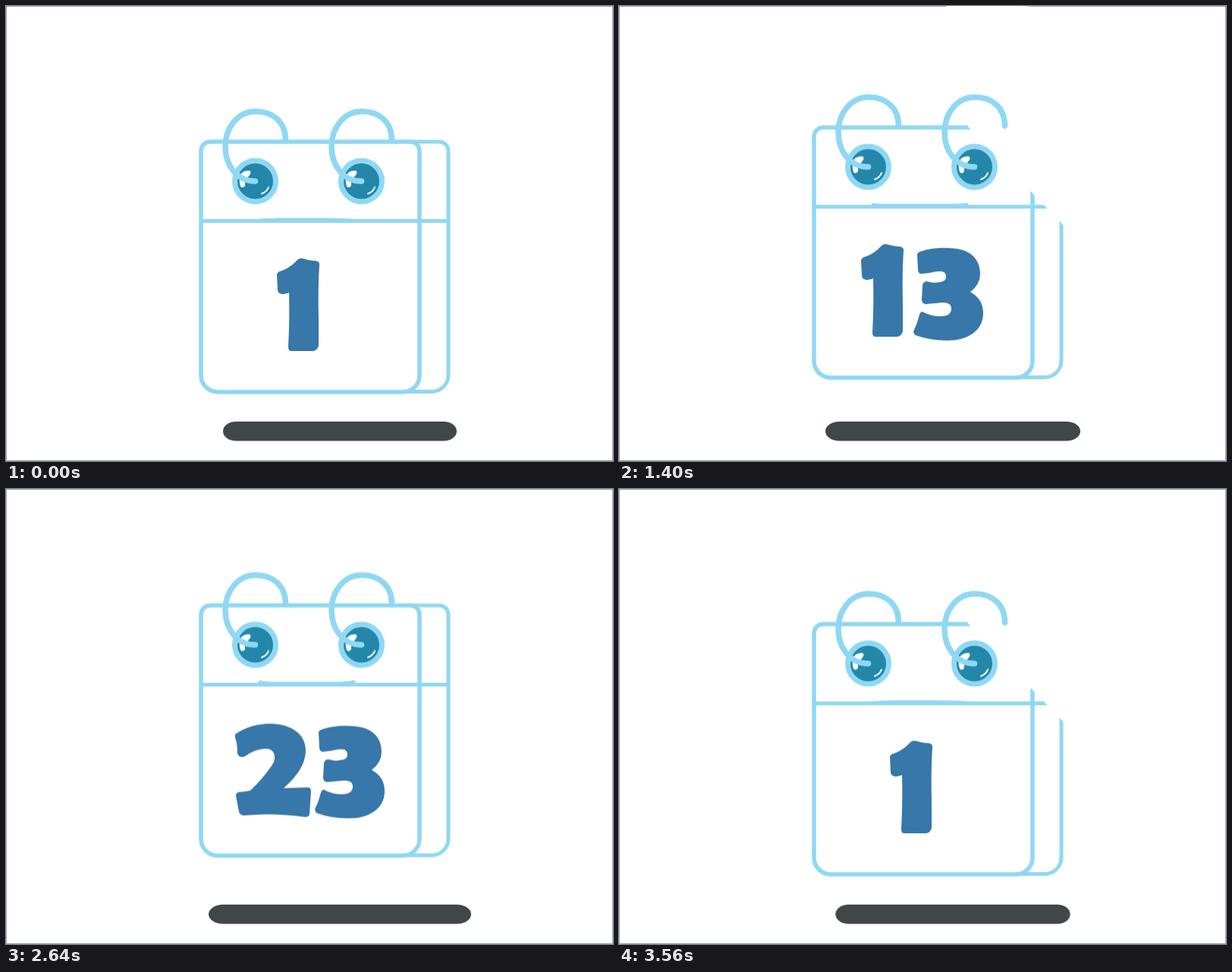
These frames come from a looping animation (800 px wide and 600 px high, 3.6 s). An HTML page without scripts:

```html
<!DOCTYPE html>
<html lang="en">
<head>
<meta charset="utf-8">
<title>Bouncing calendar</title>
<style>
  html, body { margin: 0; width: 100%; height: 100%; overflow: hidden; background: #fff; }
  svg { display: block; width: 100vw; height: 100vh; }

  .line { fill: none; stroke: #8fd8f4; stroke-width: 5.5; }
  .thin { stroke-width: 5; }
  .cap { stroke-linecap: round; }
  .ring { stroke-width: 7.5; }
  .paper { fill: #fff; }
  .ink { fill: #3777a9; fill-rule: evenodd; }

  .calendar, .shadow, .mouth {
    animation: rise 600ms cubic-bezier(.3333, 0, .6667, 1) infinite alternate;
  }
  .shadow { animation-name: spread; transform-origin: 440px 561px; }
  .mouth { animation-name: smile; }
  @keyframes rise { to { transform: translateY(-72px); } }
  @keyframes spread { to { transform: scaleX(1.348); } }
  @keyframes smile {
    from { d: path("M335 283C345 283 350 282 360 282H424C440 282 450 283 458 283"); }
    to { d: path("M335 276C340 282 346 283 355 283H440C449 283 454 281 458 275"); }
  }

  /* One day lasts 120ms: still, peeling, flying off. */
  .strip { animation: days 3600ms steps(30) -1ms infinite; }
  .next { animation-delay: -81ms; }
  .peel { animation: peel 120ms step-end -1ms infinite; }
  .fly { animation: fly 120ms step-end -1ms infinite; }
  @keyframes days { to { transform: translateX(-9000px); } }
  @keyframes peel {
    0%, 66.6% { visibility: hidden; }
    33.3% { visibility: visible; }
    100% { visibility: hidden; }
  }
  @keyframes fly {
    0% { visibility: hidden; }
    66.6%, 100% { visibility: visible; }
  }
</style>
</head>
<body>
<svg viewBox="0 0 800 600" role="img" aria-label="Calendar counting the days from 1 to 30">
  <defs>
    <path id="d0" d="M58 0A58 61.5 0 1 1 57.9 0ZM58 39.5A18.5 22 0 1 0 58.1 39.5Z"/>
    <path id="d1" d="M25 5Q29 0 34 1Q44 4 51 4Q57 5 56 10Q54 40 55 80V116Q53 123 47 123H19Q15 123 15 117Q17 80 16 46Q10 48 7 48Q1 47 1 42L0 22Q1 18 7 17Q17 13 25 5Z"/>
    <path id="d2" d="M0 17Q20 3 46 3C74 3 93 17 93 38C93 57 80 74 64 88L95 87Q100 87 100 92L98 122Q98 126 92 126Q50 120 12 124Q6 124 5 119L1 98Q1 93 7 93Q17 92 20 91Q36 76 47 60Q53 52 52 46C51 39 47 36 40 36Q27 36 13 46Q5 49 3 42Q3 28 0 22Z"/>
    <path id="d3" d="M5 14Q6 11 11 10Q28 5 46 6C74 6 88 20 88 40Q88 54 75 64Q92 73 92 92C92 116 70 128 45 128Q22 128 3 121Q0 119 0 116Q5 106 8 94Q10 88 14 91Q24 96 35 96C47 96 50 91 50 86C50 80 46 78 38 78Q26 79 16 80Q11 79 11 74L12 55Q13 50 18 50Q27 53 34 51Q43 50 43 44C43 37 38 36 30 37Q22 39 11 40Q6 40 6 34Z"/>
    <path id="d4" d="M52 6Q55 2 60 3L84 5Q90 6 89 12L87 70L98 69Q104 69 104 75L103 95Q103 100 97 100H88L89 119Q88 125 82 125H56Q50 125 51 119V102L8 103Q1 103 1 97L0 80Q0 76 3 72Q32 42 52 6ZM52 48Q44 62 34 72L52 71Z"/>
    <path id="d5" d="M14 7Q15 3 20 4Q50 7 80 3Q86 3 86 8L88 32Q88 38 82 38Q64 41 46 40L45 47Q92 46 93 84C93 112 72 127 43 127Q20 127 3 120Q0 118 1 114L7 91Q9 86 14 88Q28 94 39 93Q51 92 51 84Q51 74 36 75Q25 75 14 78Q8 78 8 72Z"/>
    <path id="d6" d="M78 2Q82 2 83 6L89 25Q90 33 82 33Q59 34 50 43Q57 41 66 41C89 41 104 57 104 80C104 107 83 125 54 125C23 125 0 106 0 72C0 30 32 3 78 2ZM53.5 66.5A13 13.5 0 1 0 53.6 66.5Z"/>
    <path id="d7" d="M3 9Q3 4 9 4Q45 8 85 6Q92 7 92 13L93 29Q92 33 88 37Q62 66 59 118Q57 127 50 127Q34 128 19 126Q13 124 14 117Q19 84 46 42Q25 42 6 43Q0 42 0 37Q3 25 3 9Z"/>
    <path id="d8" d="M50 2C78 2 95 14 95 34Q95 50 83 59Q101 68 101 89C101 113 80 126 50 126C20 126 0 113 0 89Q0 68 18 59Q6 50 6 34C6 14 23 2 50 2ZM50 28A12 10 0 1 0 50.1 28ZM50 76A14 12 0 1 0 50.1 76Z"/>
    <g id="d9"><use href="#d6" transform="rotate(180 52 63.5)"/></g>

    <!-- Days side by side, 300 units apart -->
    <g id="days" class="ink" transform="translate(0 332)">
      <use href="#d1" x="357"/>
      <use href="#d2" x="660"/>
      <use href="#d3" x="962"/>
      <use href="#d4" x="1258"/>
      <use href="#d5" x="1560"/>
      <use href="#d6" x="1860"/>
      <use href="#d7" x="2160"/>
      <use href="#d8" x="2460"/>
      <use href="#d9" x="2761"/>
      <use href="#d1" x="3008"/><use href="#d0" x="3075"/>
      <use href="#d1" x="3338"/><use href="#d1" x="3405"/>
      <use href="#d1" x="3618"/><use href="#d2" x="3686"/>
      <use href="#d1" x="3919"/><use href="#d3" x="3988"/>
      <use href="#d1" x="4214"/><use href="#d4" x="4282"/>
      <use href="#d1" x="4518"/><use href="#d5" x="4586"/>
      <use href="#d1" x="4815"/><use href="#d6" x="4883"/>
      <use href="#d1" x="5118"/><use href="#d7" x="5185"/>
      <use href="#d1" x="5415"/><use href="#d8" x="5483"/>
      <use href="#d1" x="5715"/><use href="#d9" x="5783"/>
      <use href="#d2" x="5990"/><use href="#d0" x="6093"/>
      <use href="#d2" x="6320"/><use href="#d1" x="6424"/>
      <use href="#d2" x="6600"/><use href="#d2" x="6704"/>
      <use href="#d2" x="6902"/><use href="#d3" x="7007"/>
      <use href="#d2" x="7198"/><use href="#d4" x="7302"/>
      <use href="#d2" x="7502"/><use href="#d5" x="7607"/>
      <use href="#d2" x="7802"/><use href="#d6" x="7907"/>
      <use href="#d2" x="8102"/><use href="#d7" x="8207"/>
      <use href="#d2" x="8400"/><use href="#d8" x="8504"/>
      <use href="#d2" x="8700"/><use href="#d9" x="8805"/>
      <use href="#d3" x="8992"/><use href="#d0" x="9090"/>
    </g>

    <path id="sheet" d="M260 283H545V507H460L402 495L273 341Z"/>
    <clipPath id="page"><path d="M250 283H550V509H250Z"/></clipPath>
    <clipPath id="front"><use href="#sheet"/></clipPath>
    <linearGradient id="ghost" x2="1" y2="1">
      <stop stop-color="#dfe7ed"/><stop offset="1" stop-color="#cfdae2"/>
    </linearGradient>

    <g id="eye">
      <circle cx="328.5" cy="231" r="27" fill="#2487a9" stroke="#8fd8f4" stroke-width="7"/>
      <path class="paper" d="M308 226Q309 217 321 217Q324 219 321 223Q317 228 315 230V237Q312 241 309 238Q307 232 308 226Z"/>
      <path d="M337 247.5Q344 245 346 239" fill="none" stroke="#fff" stroke-width="2" stroke-linecap="round"/>
      <path class="line ring cap" d="M328.5 231C303 231 289 209 289 185C289 160 306 139 329 139C352 139 368.5 153 368.5 177"/>
    </g>
  </defs>

  <rect x=".5" y=".5" width="799" height="599" fill="none" stroke="#90a8bc"/>
  <rect class="shadow" x="286" y="548" width="308" height="25.5" rx="17" ry="12.75" fill="#414749"/>

  <g class="calendar">
    <g clip-path="url(#page)"><use class="strip next" href="#days"/></g>

    <g class="peel">
      <use href="#sheet" class="paper"/>
      <g clip-path="url(#front)"><use class="strip" href="#days"/></g>
      <path class="paper" d="M300 373L378 388Q392 410 394 450L402 495Z"/>
      <path fill="url(#ghost)" d="M341 380L361 405L354 414L371 417L386 436V450L368 448L328 405Z"/>
      <path fill="#8fd8f4" d="M261 284Q264 320 273 342Q262 326 258 284ZM402 494Q415 504 460 505V508Q412 506 402 494Z"/>
    </g>

    <path class="line thin" d="M533 179H571A12 12 0 0 1 583 191V487A22 22 0 0 1 561 508.5H523M257 283.5H583"/>
    <path class="line" d="M257 191A12 12 0 0 1 269 179H533A12 12 0 0 1 545 191V487A22 22 0 0 1 523 509H279A22 22 0 0 1 257 487Z"/>
    <path class="line thin cap mouth" d="M335 283C345 283 350 282 360 282H424C440 282 450 283 458 283"/>

    <path class="paper fly" d="M426 71L428 32Q430 8 452 10L520 18L712 32Q755 36 762 71L780 300L640 364L583 305L460 178Z"/>

    <use href="#eye"/>
    <use href="#eye" x="140"/>
  </g>
</svg>
</body>
</html>
```
